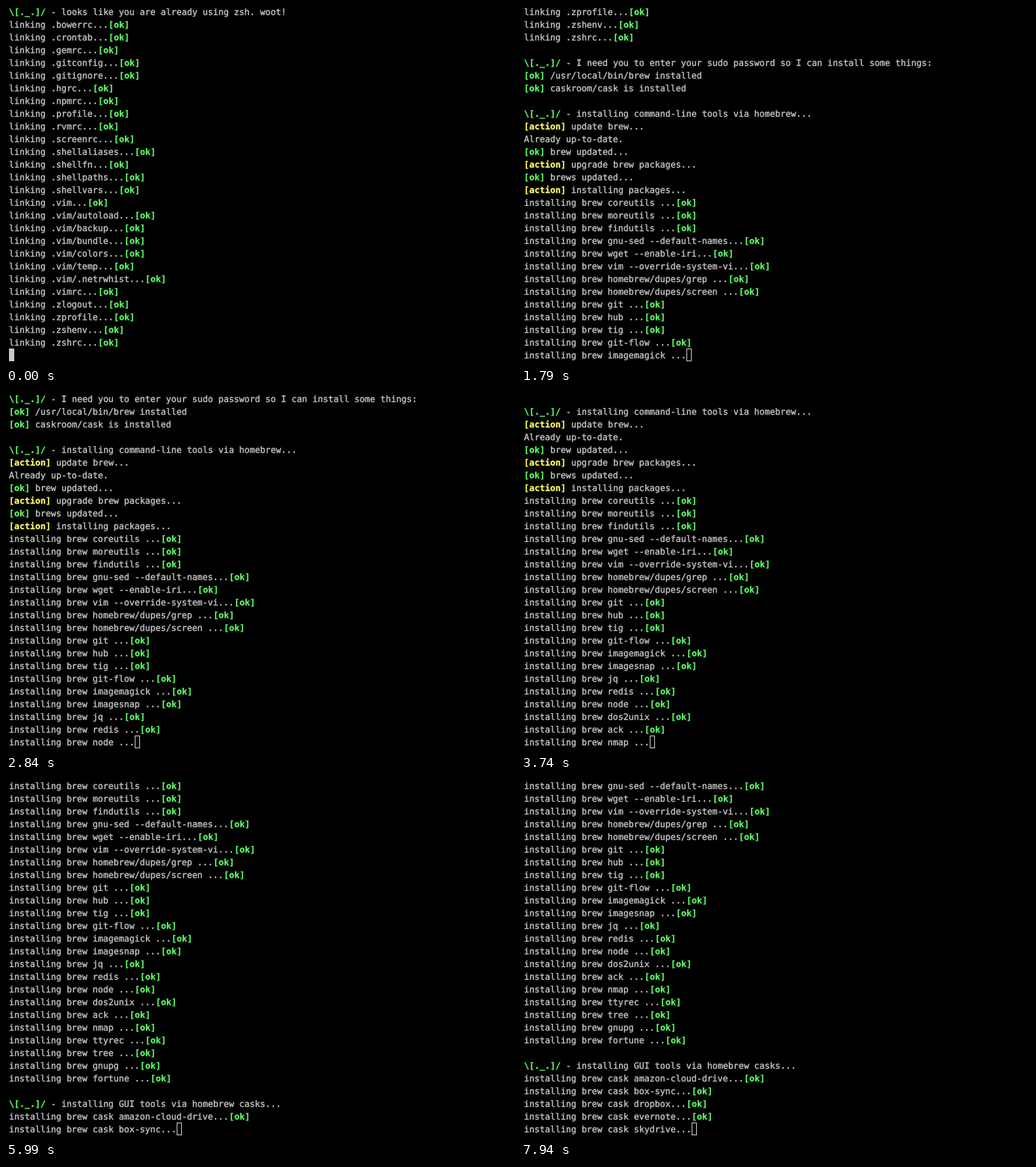
Recreate the animation shown at these times as an HTML page. Size 680 by 480 pixels, loop 8 s.

```html
<!DOCTYPE html>
<html lang="en">
<head>
<meta charset="utf-8">
<title>Dotfiles install</title>
<style>
  html, body { margin: 0; width: 100%; height: 100%; overflow: hidden; background: #000; }
  svg { display: block; width: 680px; height: 480px; }
  text {
    font: 11.628px "DejaVu Sans Mono", monospace;
    color: #c7c7c7; fill: currentColor; stroke: currentColor; stroke-width: 0.35px;
    white-space: pre; text-rendering: geometricPrecision;
  }
  .ok, .action { font-weight: bold; stroke-width: 0.25px; }
  .ok { color: #5ffa68; }
  .action { color: #fffc67; }
  #cursor { stroke: #c7c7c7; stroke-width: 1; }
</style>
</head>
<body>
<svg viewBox="0 0 680 480">
  <rect width="680" height="480" fill="#000"/>
  <g id="screen"></g>
  <rect id="cursor" y="458.5" width="6" height="16"/>
</svg>
<script>
const LOOP = 8000, ROWS = 28, LEFT = 4, CELL = 7, LINE = 17, BASELINE = 12;
const BOT = '\\[._.]/';

const dotfiles = ('bowerrc crontab gemrc gitconfig gitignore hgrc npmrc profile rvmrc screenrc ' +
  'shellaliases shellfn shellpaths shellvars vim vim/autoload vim/backup vim/bundle vim/colors ' +
  'vim/temp vim/.netrwhist vimrc zlogout zprofile zshenv zshrc').split(' ');
const brews = ('coreutils,moreutils,findutils,gnu-sed --default-names,wget --enable-iri,' +
  'vim --override-system-vi,homebrew/dupes/grep,homebrew/dupes/screen,git,hub,tig,git-flow,' +
  'imagemagick,imagesnap,jq,redis,node,dos2unix,ack,nmap,ttyrec,tree,gnupg,fortune').split(',');
const casks = 'amazon-cloud-drive box-sync dropbox evernote skydrive'.split(' ');

const log = [
  BOT + ' - looks like you are already using zsh. woot!',
  ...dotfiles.map(name => `linking .${name}...[ok]`),
  '',
  BOT + ' - I need you to enter your sudo password so I can install some things:',
  '[ok] /usr/local/bin/brew installed',
  '[ok] caskroom/cask is installed',
  '',
  BOT + ' - installing command-line tools via homebrew...',
  '[action] update brew...',
  'Already up-to-date.',
  '[ok] brew updated...',
  '[action] upgrade brew packages...',
  '[ok] brews updated...',
  '[action] installing packages...',
  ...brews.map(name => `installing brew ${name}${name.includes(' ') ? '' : ' '}...[ok]`),
  '',
  BOT + ' - installing GUI tools via homebrew casks...',
  ...casks.map(name => `installing brew cask ${name}...[ok]`),
];

// Each step: start time, bottom line, whether that line is already printed.
const steps = [[0, 27, false], [300, 30, false], [600, 34, false]];
[1190, 1490, 1790, 2090, 2240, 2690, 2840, 3140, 3590, 3740, 4040, 4190, 4640, 4790]
  .forEach((time, i) => steps.push([time, 49 + i, true]));
steps.push([5090, 65, false]);
[5240, 5990, 6590, 7190, 7940].forEach((time, i) => steps.push([time, 65 + i, true]));

const screen = document.getElementById('screen');
const cursor = document.getElementById('cursor');

function add(parent, tag, attrs, content = '') {
  const node = document.createElementNS('http://www.w3.org/2000/svg', tag);
  for (const key in attrs) node.setAttribute(key, attrs[key]);
  node.textContent = content;
  return parent.appendChild(node);
}

function tagClass(part) {
  if (part === '[action]') return 'action';
  return part === '[ok]' || part === BOT ? 'ok' : '';
}

function drawLine(line, row) {
  const text = add(screen, 'text', { y: BASELINE + row * LINE });
  let column = 0;
  for (const part of line.split(/(\\\[\._\.\]\/|\[ok\]|\[action\])/)) {
    if (part) add(text, 'tspan', { x: LEFT + column * CELL, class: tagClass(part) }, part);
    column += part.length;
  }
}

function drawStep([time, bottom, printed]) {
  const top = bottom - ROWS + 1;
  const pending = printed ? log[bottom].replace('[ok]', '') : '';
  screen.replaceChildren();
  log.slice(top, bottom).forEach(drawLine);
  drawLine(pending, ROWS - 1);
  cursor.setAttribute('x', LEFT + pending.length * CELL + 0.5);
  cursor.setAttribute('fill', time < 1190 ? '#c7c7c7' : 'none');
}

let shown = null;
function render(time) {
  const step = steps.filter(([start]) => start <= time).pop();
  if (step !== shown) drawStep(shown = step);
}

const began = performance.now();
function tick() {
  render((performance.now() - began) % LOOP);
  requestAnimationFrame(tick);
}
tick();
</script>
</body>
</html>
```
